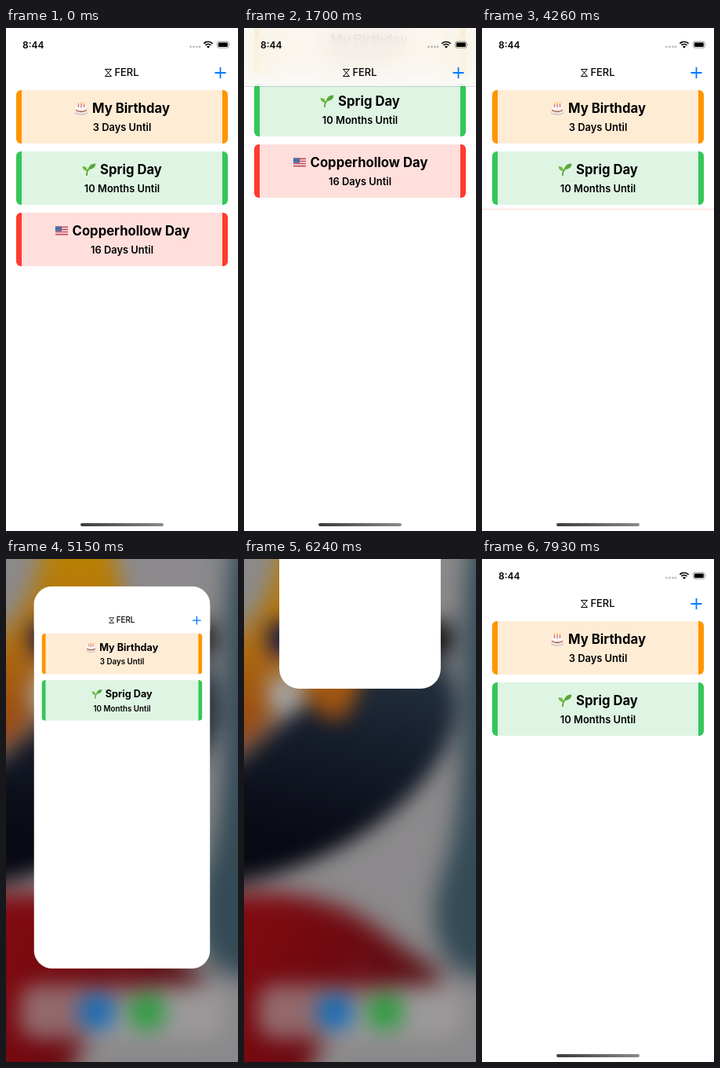
Recreate the animation shown at these times as an HTML page. Size 296 px wide and 640 px high, loop 7980 ms.

```html
<!DOCTYPE html>
<html lang="en">
<head>
<meta charset="utf-8">
<title>Countdown list</title>
<style>
html, body { margin: 0; width: 100%; height: 100%; overflow: hidden; background: #777; }
body { font-family: Inter, Roboto, sans-serif; color: #000; }
div, svg { position: absolute; box-sizing: border-box; }
#stage, #home, #icons, #app, #list { inset: 0 auto auto 0; width: 296px; height: 640px; }
#stage { overflow: hidden; }
#wall { inset: -40px auto auto -40px; }
.icon { width: 47px; height: 47px; border-radius: 11px; }
.name { width: 80px; text-align: center; color: #fff; font: 500 9.4px/12px Inter, sans-serif; }
.dot { width: 6px; height: 6px; border-radius: 3px; background: #fff; }
#dock { inset: 558px auto auto 8px; width: 279px; height: 74px; border-radius: 23px; background: rgba(222, 216, 218, .62); }
#app { background: #fff; transform-origin: 0 0; }
.row { width: 296px; height: 77.8px; overflow: hidden; }
.card { inset: 5px auto auto 13px; width: 270px; height: 68px; border: solid; border-width: 0 7px; border-radius: 6px; }
.title, .sub { width: 100%; text-align: center; white-space: nowrap; }
.title { inset: 12px auto auto 0; display: flex; justify-content: center; gap: 5px; font: 700 16.7px/22px Inter, sans-serif; }
.title svg { position: static; margin-top: 2px; flex: none; }
.sub { inset: 39px auto auto 0; font: 600 12.9px/18px Inter, sans-serif; }
#del { right: 0; top: 0; height: 100%; background: #ff3b30; overflow: hidden; }
#del div { inset: 30px auto auto 0; color: #fff; font: 400 12.5px/18px Inter, sans-serif; }
#nav { inset: 0 auto auto 0; width: 296px; height: 74px; background: #fff; }
#nav.over { background: rgba(249, 249, 249, .8); backdrop-filter: blur(15px) saturate(1.8); box-shadow: 0 .6px 0 rgba(0, 0, 0, .25); }
#nav div { inset: 48px auto auto 138.5px; font: 500 12.9px/18px Inter, sans-serif; }
#tag { inset: 0 auto auto 0; width: 100px; height: 21px; color: #fff; font: 500 12px/21px Inter, sans-serif; padding: 0 0 0 27px; }
#tag div { inset: 0 auto auto 0; width: 21px; height: 21px; border-radius: 5px; background: #e4e4e4; }
#status { inset: 0 auto auto 0; }
#bar { inset: 629.5px auto auto 95px; width: 106px; height: 4px; border-radius: 2px; background: linear-gradient(90deg, #3c3c3c, #8a8a8a); }
</style>
</head>
<body>
<div id="stage">
  <div id="home">
    <svg id="wall" width="376" height="720" viewBox="-40 -40 376 720">
      <defs>
        <linearGradient id="gold" gradientUnits="userSpaceOnUse" x1="0" y1="0" x2="0" y2="215">
          <stop stop-color="#f6ab05"/><stop offset=".45" stop-color="#eb9412"/><stop offset="1" stop-color="#c9601a"/>
        </linearGradient>
        <linearGradient id="navy" gradientUnits="userSpaceOnUse" x1="190" y1="60" x2="120" y2="370">
          <stop stop-color="#3d5266"/><stop offset=".5" stop-color="#1f2b3e"/><stop offset="1" stop-color="#0b0d1a"/>
        </linearGradient>
        <linearGradient id="red" gradientUnits="userSpaceOnUse" x1="30" y1="440" x2="250" y2="550">
          <stop stop-color="#a90d17"/><stop offset=".6" stop-color="#8a0c14"/><stop offset="1" stop-color="#6b2024"/>
        </linearGradient>
        <filter id="soft" x="-30%" y="-30%" width="160%" height="160%"><feGaussianBlur stdDeviation="8"/></filter>
      </defs>
      <path fill="#b9b7b9" d="M-40-40H336V680H-40z"/>
      <path fill="#456472" filter="url(#soft)" d="M360-40H292C266 120 292 280 258 385C232 450 240 500 280 528L360 540z"/>
      <path fill="url(#navy)" d="M-40 265C30 215 80 200 100 150L148 56C215 70 270 125 270 188C270 280 130 400-40 416z"/>
      <path fill="#aaa3a2" filter="url(#soft)" d="M-60 130L20 150L45 205L-10 258L-60 262z"/>
      <path fill="url(#gold)" filter="url(#soft)" d="M50-60H130V180L95 190C70 165 45 185 10 235L-60 250V120C0 110 50 50 50-60z"/>
      <path fill="url(#gold)" d="M85-40H118C160 20 160 120 141 180C131 211 108 211 92 190C80 130 80 50 85-40z"/>
      <path fill="url(#red)" filter="url(#soft)" d="M-60 432C50 412 125 432 180 478C225 512 262 525 250 545C225 552 165 545 130 572C95 600 90 650 60 700H-60z"/>
    </svg>
    <div id="icons"></div>
  </div>
  <div id="app">
    <div id="list"></div>
    <div id="nav">
      <svg width="296" height="74" fill="none">
        <path d="M126.5 52.5h8l-8 9h8z" stroke="#000"/>
        <path d="M266.5 57h14M273.5 50v14" stroke="#007aff" stroke-width="1.8"/>
      </svg>
      <div>FERL</div>
    </div>
  </div>
  <div id="tag"><div></div>Ferl</div>
  <svg id="status" width="296" height="40" fill="currentColor">
    <text x="21" y="25.7" font-size="12" font-weight="600">8:44</text>
    <g opacity=".25"><circle cx="235.5" cy="24" r="1.4"/><circle cx="239.5" cy="24" r="1.4"/><circle cx="243.5" cy="24" r="1.4"/><circle cx="247" cy="24" r="1.4"/></g>
    <path d="M258 25.8l-2-2a2.8 2.8 0 0 1 4 0z"/>
    <path d="M254.5 22a5 5 0 0 1 7 0M252.4 19.8a8 8 0 0 1 11.2 0" fill="none" stroke="currentColor" stroke-width="1.7"/>
    <rect x="269.5" y="17.2" width="14.6" height="8" rx="2.3" fill="none" stroke="currentColor" opacity=".4"/>
    <rect x="270.8" y="18.5" width="12" height="5.4" rx="1.2"/>
    <path d="M285.2 19.8q1.4 1.3 0 2.8z" opacity=".5"/>
  </svg>
  <div id="bar"></div>
</div>
<script>
const $ = id => document.getElementById(id);
const place = (x, y) => `inset:${y}px auto auto ${x}px`;

// Home screen: [x, y, colour, label]
$('icons').innerHTML = '<div id="dock"></div>' + [
  [22, 61, '#1e1f5c', 'Taskchits'], [90, 61, '#c4c4c6', 'Kinpages'],
  [158.5, 61, '#2f9bef', 'Slips'], [227, 61, '#121214', 'Tocks'],
  [22, 136, '#dcdcdc', 'Ferl'], [90, 572, '#2492f2', ''], [159, 572, '#3fd158', '']
].map(([x, y, color, name]) =>
  `<div class="icon" style="${place(x, y)};background:${color}"></div>
   <div class="name" style="${place(x - 17, y + 51)}">${name}</div>`).join('') +
  `<div class="dot" style="${place(138, 529)};opacity:.5"></div><div class="dot" style="${place(152, 529)}"></div>`;
const appIcon = document.querySelectorAll('.icon')[4];

const cake = `<path d="M2 8.5q7-4 14 0v6q-7 4-14 0z" fill="#f3e6e2"/><ellipse cx="9" cy="8.5" rx="7" ry="2.6" fill="#fffaf6"/>
  <path d="M2 11.5q7 4 14 0" stroke="#a4574c" stroke-width="1.4" fill="none"/><path d="M1 15q8 4.5 16 0" stroke="#b9b3b5" fill="none"/>
  <path d="M5.5 8V4M9 8.5V3.5M12.5 8V4" stroke="#d0607a" stroke-width="1.2"/><path d="M5.5 3.5V2M9 3V1.5M12.5 3.5V2" stroke="#f5a623" stroke-width="1.3"/>`;
const sprout = `<path d="M6 17q-.5-6 3.5-9" stroke="#5b9b32" stroke-width="1.6" fill="none"/>
  <path d="M8 9Q9 1 17.5 1.5Q17 9 8 9z" fill="#58a83a"/><path d="M7 11Q1 11 .5 5Q7 4.5 7 11z" fill="#71bd45"/>`;
const flag = `<path d="M1 3.5h16v11H1z" fill="#f5f1f1"/><path d="M1 4.3h16M1 7.4h16M1 10.5h16M1 13.6h16" stroke="#c94450" stroke-width="1.6"/>
  <path d="M1 3.5h8v6H1z" fill="#3c5a94"/><path d="M2 5h6M2 7.5h6" stroke="#dfe6f3" stroke-width=".7" stroke-dasharray=".8 1"/>`;

$('list').innerHTML = [
  [cake, 'My Birthday', '3 Days Until', '#ff9500', '#ffecd5'],
  [sprout, 'Sprig Day', '10 Months Until', '#34c759', '#dff5e4'],
  [flag, 'Copperhollow Day', '16 Days Until', '#ff3b30', '#ffdfdc']
].map(([art, title, sub, edge, fill], i) =>
  `<div class="row" style="${place(0, 74 + 77.8 * i)}"><div class="card" style="border-color:${edge};background:${fill}">
   <div class="title"><svg width="18" height="18">${art}</svg>${title}</div><div class="sub">${sub}</div></div></div>`).join('');
const lastRow = $('list').lastChild, lastCard = lastRow.firstChild;
lastRow.insertAdjacentHTML('beforeend', '<div id="del"><div>Delete</div></div>');

const LOOP = 7980;
// Bursts of motion: [first change, last change, steps]
const bursts = [[0, 0, 1], [630, 1390, 8], [1580, 2330, 8], [2440, 2440, 1], [2610, 2610, 1], [2810, 3580, 8],
  [3690, 4260, 6], [4920, 5690, 8], [5800, 6450, 7], [6640, 7380, 8], [7490, 7930, 5]];

function snap(t) {
  const [a, b, n] = bursts.filter(s => s[0] <= t).pop();
  if (n === 1) return a;
  const step = (b - a) / (n - 1);
  return a + step * Math.min(n - 1, Math.floor((t - a) / step + .01));
}

// Value at t along evenly spaced points from a to b
function along(t, a, b, points) {
  const u = Math.max(0, Math.min(1, (t - a) / (b - a))) * (points.length - 1);
  const i = Math.min(points.length - 2, Math.floor(u));
  return points[i] + (points[i + 1] - points[i]) * (u - i);
}

function drawList(t) {
  const scroll = t < 1500
    ? along(t, 520, 1390, [0, -6, -26, -45, -54, -48, -24, -8, -1])
    : along(t, 1580, 2545, [32, 87, 106, 94, 58, 30, 13, 5, 2, 0]);
  $('list').style.transform = `translateY(${-scroll}px)`;
  $('nav').className = scroll > 0 ? 'over' : '';

  const slide = along(t, 2700, 3690, [0, 8, 30, 60, 78, 85, 110, 160, 230, 296]);
  lastRow.style.display = t < 4920 ? '' : 'none';
  lastRow.style.height = along(t, 3690, 4260, [77.8, 72, 50, 24, 8, 1.5]) + 'px';
  lastRow.style.opacity = along(t, 3918, 4260, [1, .8, .5, .2]);
  lastCard.style.transform = `translateX(${-slide}px)`;
  $('del').style.width = slide + 'px';
  $('del').firstChild.style.transform = `translateX(${slide < 100 ? (slide - 40) / 2 : 14}px)`;
}

function drawApp(t) {
  const opening = t >= 7200;
  let x, y, scale, clip = 0, radius;
  if (opening) {
    const p = along(t, 7270, 7930, [.02, .12, .42, .74, .92, .98, 1]);
    scale = .159 + .841 * p;
    x = 22 * (1 - p);
    y = 136 * (1 - p);
    clip = 344 * (1 - p);
    radius = 70 * (1 - p);
    $('app').style.opacity = along(t, 7160, 7490, [0, .3, .75, 1]);
  } else {
    scale = along(t, 4810, 5580, [1, .97, .88, .76, .68, .665, .685, .696]);
    const lift = along(t, 4810, 5580, [0, -8, -26, -42, -40, -24, -11, -7])
      + along(t, 5690, 6450, [0, -12, -45, -105, -210, -370, -520, -620]);
    x = 148 * (1 - scale);
    y = 320 * (1 - scale) + lift;
    radius = along(t, 4810, 5250, [0, 26, 37]);
    $('app').style.opacity = 1;
  }
  $('app').style.display = t < 6450 || opening ? '' : 'none';
  $('app').style.transform = `translate(${x}px,${y}px) scale(${scale})`;
  $('app').style.clipPath = radius ? `inset(0 0 ${clip}px 0 round ${radius}px)` : 'none';
  $('list').style.opacity = $('nav').style.opacity = opening ? along(t, 7380, 7710, [0, 1]) : 1;
  $('tag').style.transform = `translate(${x + 24}px,${y - 28}px)`;
  $('tag').style.opacity = opening || t >= 6450 ? 0 : along(t, 5140, 5470, [0, 1]);
}

function drawHome(t) {
  const away = t < 7200 ? along(t, 6530, 7070, [1, .8, .5, .2, .05, 0]) : along(t, 7270, 7930, [0, .6]);
  $('home').style.display = t >= 4920 && t < 7930 ? '' : 'none';
  $('home').style.filter = away ? `blur(${13 * away}px) brightness(${1 - .25 * away})` : 'none';
  $('icons').style.transform = `scale(${1 - .07 * away})`;
  appIcon.style.filter = t > 7100 ? 'brightness(.63)' : 'none';

  const inApp = t < 4920 || t >= 7600;
  $('status').style.color = inApp ? '#000' : '#fff';
  $('status').style.opacity = inApp ? 1 : along(t, 6530, 6960, [0, 1]);
  $('bar').style.opacity = inApp ? 1 : 0;
}

function frame(now) {
  const t = snap(now % LOOP);
  drawList(t);
  drawApp(t);
  drawHome(t);
  requestAnimationFrame(frame);
}
frame(performance.now());
</script>
</body>
</html>
```
